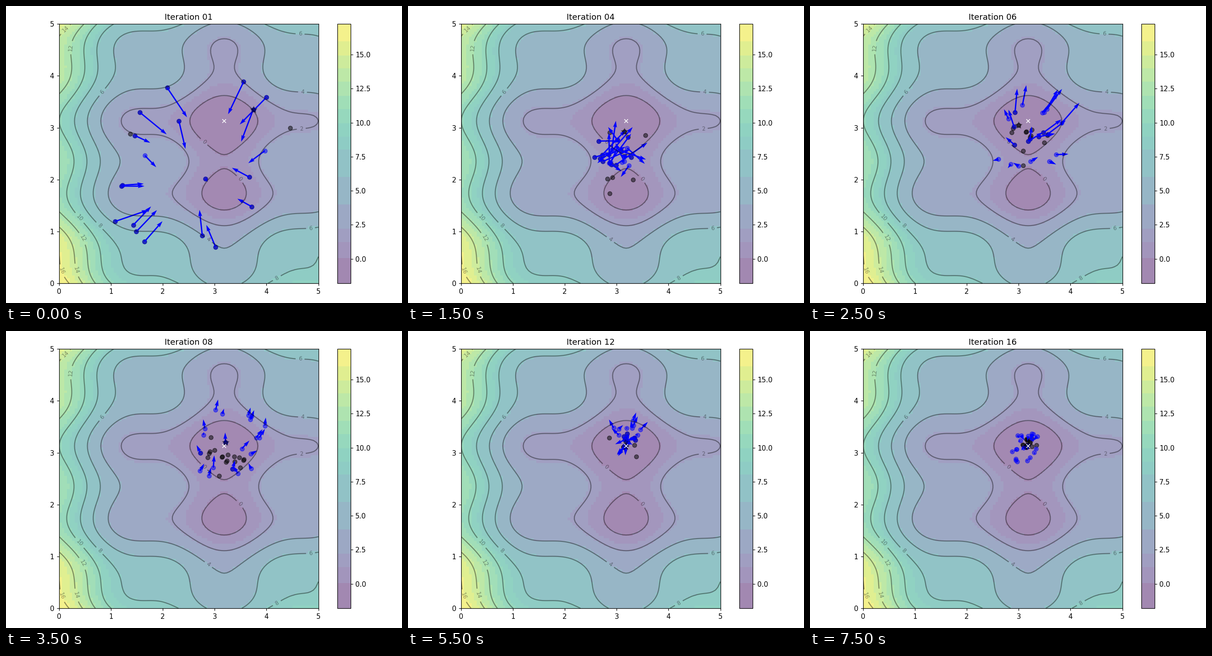
A matplotlib script for the animation above (8 s loop, 864x648 px).

```python
import numpy as np
import matplotlib.pyplot as plt
from matplotlib.animation import FuncAnimation
from matplotlib.colors import ListedColormap

WIDTH, HEIGHT, DPI = 864, 648, 108
FRAMES = 16
WARMUP = 2        # swarm steps already taken when the first picture shows
W, C1, C2 = 0.8, 0.1, 0.2
N = 20


def f(x, y):
    """Objective to be minimised."""
    return ((x - 3.14) ** 2 + (y - 2.72) ** 2
            + np.sin(3 * x + 1.41) + np.sin(4 * y - 1.73))


def run_swarm(steps):
    """Run the particle swarm and return (X, V, pbest, gbest) per step."""
    rng = np.random.RandomState(100)
    X = rng.rand(2, N) * 5
    V = rng.randn(2, N) * 0.1
    pbest, pbest_obj = X.copy(), f(*X)
    gbest = pbest[:, pbest_obj.argmin()].copy()
    history = []
    for _ in range(steps):
        r1, r2 = rng.rand(2)
        V = W * V + C1 * r1 * (pbest - X) + C2 * r2 * (gbest[:, None] - X)
        X = X + V
        obj = f(*X)
        better = obj <= pbest_obj
        pbest = np.where(better, X, pbest)
        pbest_obj = np.minimum(pbest_obj, obj)
        gbest = pbest[:, pbest_obj.argmin()].copy()
        history.append((X, V, pbest, gbest))
    return history


def banded(low, high, inner):
    """Viridis in flat steps that change at the inner values."""
    edges = np.array([low, *inner, high])
    mids = (edges[:-1] + edges[1:]) / 2
    band = np.searchsorted(inner, np.linspace(low, high, 256))
    viridis = plt.get_cmap("viridis")
    return ListedColormap(viridis((mids[band] - low) / (high - low)))


def place(axes, left, top, width, height):
    """Position axes by pixels measured from the top left corner."""
    axes.set_position([left / WIDTH, 1 - (top + height) / HEIGHT,
                       width / WIDTH, height / HEIGHT])


states = run_swarm(FRAMES + WARMUP)[WARMUP - 1:]
X, V, pbest, gbest = states[0]

grid = np.linspace(0, 5, 100)
x, y = np.meshgrid(grid, grid)
z = f(x, y)
low = z.argmin()
cmap = banded(z.min(), z.max(), [0, 1.2, 2.2, 4, 6, *range(8, 17)])

fig, ax = plt.subplots(figsize=(WIDTH / DPI, HEIGHT / DPI), dpi=DPI)
img = ax.imshow(z, extent=[0, 5, 0, 5], origin="lower", cmap=cmap, alpha=0.5)
bar = fig.colorbar(img, ax=ax)
ax.plot([x.flat[low]], [y.flat[low]], marker="x", markersize=5, color="white")
contours = ax.contour(x, y, z, 10, colors="black", alpha=0.4)
ax.clabel(contours, inline=True, inline_spacing=5.4, fontsize=8, fmt="%.0f")

best_dots = ax.scatter(*pbest, marker="o", color="black", alpha=0.5)
dots = ax.scatter(*X, marker="o", color="blue", alpha=0.5)
arrows = ax.quiver(*X, *V, color="blue", width=0.005,
                   angles="xy", scale_units="xy", scale=1)
star = ax.scatter(*gbest, marker="*", s=100, color="black", alpha=0.4)
ax.set_xlim(0, 5)
ax.set_ylim(0, 5)
place(ax, 115.6, 39.2, 566, 566)
place(bar.ax, 723.3, 39.2, 28.3, 566)


def animate(i):
    X, V, pbest, gbest = states[i]
    ax.set_title(f"Iteration {i + 1:02d}")
    best_dots.set_offsets(pbest.T)
    dots.set_offsets(X.T)
    arrows.set_offsets(X.T)
    # angles="xy" measures directions from these anchors
    arrows.XY = X.T
    arrows.set_UVC(*V)
    star.set_offsets([gbest])
    return best_dots, dots, arrows, star


anim = FuncAnimation(fig, animate, frames=FRAMES, interval=500,
                     repeat=True, repeat_delay=0, blit=False)
plt.show()
```
